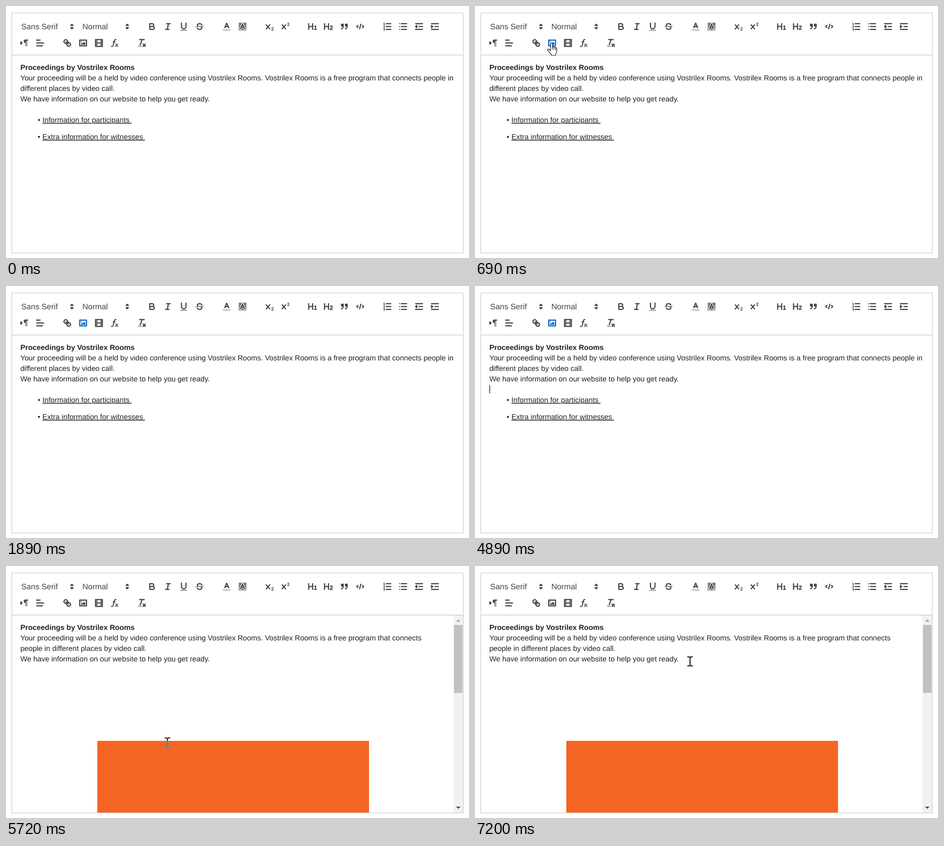
Recreate the animation shown at these times as an HTML page. Size 1014 px wide and 552 px high, loop 8 s.

```html
<!DOCTYPE html>
<html lang="en">
<head>
<meta charset="utf-8">
<title>Inserting an image in a rich text editor</title>
<style>
  html, body { margin: 0; width: 100%; height: 100%; overflow: hidden; background: #fff; }
  svg { display: block; width: 100%; height: 100%; isolation: isolate; }
  text { font: 16.12px 'Liberation Sans', Arial, sans-serif; fill: #212121; text-rendering: geometricPrecision; }
  .label { font-size: 17.4px; fill: #444; }
  .bold { font-weight: 700; }
  .link { text-decoration: underline; }
  .icon { color: #444; fill: none; stroke: currentColor; stroke-width: 2; stroke-linecap: round; stroke-linejoin: round; }
  .icon.active { color: #06c; }
  .fill { fill: currentColor; stroke: none; }
  .both { fill: currentColor; }
  .thin { stroke-width: 1; }
  .frame { fill: none; stroke: #ccc; stroke-width: 1.4; }
  .caret { fill: #111; }
  #beam { fill: none; stroke: #fff; stroke-width: 2; mix-blend-mode: difference; }
  #hand { fill: #fff; stroke: #111; stroke-width: 1.2; stroke-linejoin: round; stroke-linecap: round; }
</style>
</head>
<body>
<svg viewBox="0 0 1014 552">
  <rect width="1014" height="552" fill="#fff"/>
  <g id="toolbar">
    <text class="label" x="33.3" y="51">Sans Serif</text>
    <text class="label" x="167.2" y="51">Normal</text>
  </g>

  <text class="bold" x="31.4" y="140">Proceedings by Vostrilex Rooms</text>
  <text x="31.4" y="209">We have information on our website to help you get ready.</text>

  <g id="before">
    <text x="31.4" y="163">Your proceeding will be a held by video conference using Vostrilex Rooms. Vostrilex Rooms is a free program that connects people in</text>
    <text x="31.4" y="186">different places by video call.</text>
    <text x="69.3" y="255">•</text>
    <text class="link" x="79.8" y="255">Information for participants&#160;</text>
    <text x="69.3" y="292">•</text>
    <text class="link" x="79.8" y="292">Extra information for witnesses&#160;</text>
    <rect id="lineCaret" class="caret" x="31.5" y="217" width="1.4" height="18"/>
  </g>

  <g id="after">
    <text x="31.4" y="163">Your proceeding will be a held by video conference using Vostrilex Rooms. Vostrilex Rooms is a free program that connects</text>
    <text x="31.4" y="186">people in different places by video call.</text>
    <svg y="108" width="1001" height="432.5" viewBox="0 108 1001 432.5">
      <rect x="200" y="383" width="595" height="595" fill="#f56523"/>
      <rect id="imageCaret" class="caret" x="960.2" y="215" width="1.4" height="400"/>
    </svg>
    <rect x="980" y="108" width="21" height="432.5" fill="#f1f1f1"/>
    <rect x="981.2" y="129" width="18.6" height="149" fill="#c1c1c1"/>
    <path d="M985.5 122h10l-5-5z" fill="#a3a3a3"/>
    <path d="M985.5 527h10l-5 5z" fill="#505050"/>
  </g>

  <path class="frame" d="M12.6 15.4H1001.5V540.9H12.6zM12.6 107.5H1001.5"/>

  <path id="beam" d="M-6-10H-2L0-8.5 2-10H6M0-8.5V8.5M-6 10H-2L0 8.5 2 10H6"/>
  <g id="hand">
    <path d="M-2 16V2.2a2 2 0 0 1 4 0V9q1.500-1.500 3.500.500 2-1 3.500.800 2.500-.500 2.500 2V18q0 3-2.500 6.500V27H-.500V24.500L-8 16.500q-1.500-2.500.600-3.300Q-5.500 13-2 17z"/>
    <path d="M2 9v5M5.500 9.500v5M9 10.300V15"/>
  </g>
</svg>

<script>
const LOOP = 8000;
const UNIT = 1.24;   // toolbar icons use an 18-unit box
const PITCH = 34.72;
const GAP = 59.4;
const $ = id => document.getElementById(id);

const line = (x1, y1, x2, y2, cls = '') => `<path class="${cls}" d="M${x1} ${y1}L${x2} ${y2}"/>`;
const path = (d, cls = '') => `<path class="${cls}" d="${d}"/>`;
const rect = (x, y, w, h, cls = '', r = 0) =>
  `<rect class="${cls}" x="${x}" y="${y}" width="${w}" height="${h}" rx="${r}"/>`;
const rows = (starts, ends) => [4, 9, 14].map((y, i) => line(starts[i], y, ends[i], y)).join('');

const cross = line(3, 6, 9, 13) + line(9, 6, 3, 13);
const smallTwo = y => path(`M12.5 ${y + 1.6}q.4-1.200 1.500-1.200 1.300.100 1.300 1.400c0 2-2.800 2.300-2.800 3.700h3`, 'thin');
const letterH = path('M2 4V14M9 4V14M2 9H9');
const letterA = y => path(`M5.500 ${y + 8}L9 ${y}L12.500 ${y + 8}M6.380 ${y + 6}H11.630`);

function hatch() {
  let out = '';
  for (let s = 6; s <= 30; s += 2) {
    const a = Math.max(2.5, s - 15.5), b = s - a;
    out += line(a, b, b, a, 'thin');
  }
  return out;
}

function film() {
  let out = rect(3, 3, 12, 12) + rect(5, 3, 1, 12, 'fill') + rect(12, 3, 1, 12, 'fill') + rect(5, 8, 8, 2, 'fill');
  for (const y of [5, 7, 10, 12]) out += rect(3, y, 3, 1, 'fill') + rect(12, y, 3, 1, 'fill');
  return out;
}

const strike = path('M9.007 8C6.542 7.791 6 7.519 6 6.500 6 5.792 7.283 5 9 5c1.571 0 2.765.679 2.969 1.309a1 1 0 0 0 1.900-.617C13.356 4.106 11.354 3 9 3 6.200 3 4 4.538 4 6.500a3.200 3.200 0 0 0 .500 1.843z', 'fill');
const chain = path('M8.900 4.577a3.476 3.476 0 0 1 .360 4.679A3.476 3.476 0 0 1 4.577 8.900C3.185 7.500 2.035 6.400 4.217 4.217S7.500 3.185 8.900 4.577z');
const halfTurn = shape => `<g transform="rotate(180 9 9)">${shape}</g>`;
const quote = x => rect(x, 5, 3, 3, 'both') + path(`M${x + 3} 8c0 4.031-3 5-3 5`);

const icons = {
  picker: path('M7 11L9 13 11 11zM7 7L9 5 11 7z'),
  bold: path('M5 4H9.500a2.500 2.500 0 0 1 0 5H5zM5 9H10.500a2.500 2.500 0 0 1 0 5H5z'),
  italic: path('M7 4H13M5 14H11M8 14L10 4'),
  underline: path('M5 3V9a4 4 0 0 0 8 0V3') + rect(3, 15, 12, 1, 'fill', .5),
  strike: line(15.5, 8.5, 2.5, 9.5, 'thin') + strike + halfTurn(strike),
  color: `<g opacity=".4">${line(3, 15, 15, 15)}</g>` + letterA(3),
  background: hatch() + `<g stroke="#fff" stroke-width="4">${letterA(5)}</g>` + letterA(5),
  sub: cross + smallTwo(10),
  sup: cross + smallTwo(2),
  h1: letterH + path('M12.300 9L14.200 7.700V14M12.200 14H15.900" stroke-width="1.700'),
  h2: letterH + path('M12.200 8.700Q13 7.800 14 7.800 15.600 7.900 15.600 9.400C15.600 11.500 12.200 12 12 14H16" stroke-width="1.700'),
  quote: quote(4) + quote(11),
  code: path('M5 7L3 9 5 11M13 7L15 9 13 11M10 5L8 13'),
  ordered: rows([7, 7, 7], [15, 15, 15]) +
    path('M2.500 5.500h2M2.500 3L3.500 2.500v3M4.500 10.500h-2c0-.234 1.850-1.076 1.850-2.234A.959.959 0 0 0 2.500 8.156M2.500 14.846a.959.959 0 0 0 1.850-.109A.700.700 0 0 0 3.750 14a.688.688 0 0 0 .600-.736.959.959 0 0 0-1.850-.109', 'thin'),
  bullets: rows([6, 6, 6], [15, 15, 15]) + rows([3, 3, 3], [3, 3, 3]),
  outdent: rows([3, 9, 3], [15, 15, 15]) + path('M5 7V11L3 9z'),
  indent: rows([3, 9, 3], [15, 15, 15]) + path('M3 7V11L5 9z', 'both'),
  direction: path('M3 11L5 9 3 7z', 'both') + line(15, 4, 11, 4) +
    path('M11 3a3 3 0 0 0 0 6h1V3z', 'fill') + rect(11, 4, 1, 11, 'fill') + rect(13, 4, 1, 11, 'fill'),
  align: rows([3, 3, 3], [9, 15, 13]),
  link: line(7, 7, 11, 11) + chain + halfTurn(chain),
  image: rect(3, 4, 12, 10) + '<circle class="fill" cx="6" cy="7" r="1"/>' +
    path('M5 12V11L7 9 8 10 11 7 13 9V12z', 'fill'),
  video: film(),
  formula: path('M11.759 2.482a2.561 2.561 0 0 0-3.530.607A7.656 7.656 0 0 0 6.800 6.200C6.109 9.188 5.275 14.677 4.150 14.927a1.545 1.545 0 0 0-1.300-.933A.922.922 0 0 0 2 15.036S1.954 16 4.119 16s3.091-2.691 3.700-5.553L8.775 6.200c.381-1.421.807-2.521 1.306-2.676a1.014 1.014 0 0 0 1.020.560A.966.966 0 0 0 11.759 2.482z', 'fill') +
    rect(5.15, 6.2, 5, 1.6, 'fill', .8) +
    path('M9.700 15.200Q10.500 15.200 11.800 13.200T15 11.200M10.300 11Q11.800 10.500 12.200 12.200C12.700 14.500 13 15.700 14.700 15.100" stroke-width="1.300'),
  clean: path('M5 3H13M6 12L9.350 3M11 11L15 15M15 11L11 15') + rect(2, 14, 7, 1, 'fill', .5),
};

function addIcon(name, x, y) {
  $('toolbar').insertAdjacentHTML('beforeend',
    `<g class="icon" id="icon-${name}" transform="translate(${x - 9 * UNIT} ${y - 9 * UNIT}) scale(${UNIT})">${icons[name]}</g>`);
}

function addGroups(x, y, groups) {
  for (const group of groups) {
    for (const name of group.split(' ')) {
      addIcon(name, x, y);
      x += PITCH;
    }
    x += GAP - PITCH;
  }
}

addIcon('picker', 144.3, 45);
addIcon('picker', 265.5, 45);
addGroups(319.8, 45, ['bold italic underline strike', 'color background', 'sub sup',
  'h1 h2 quote code', 'ordered bullets outdent indent']);
addGroups(40, 81, ['direction align', 'link image video formula', 'clean']);

// Pointer trips: [ms, x, y]; the pointer is hidden between trips.
const trips = [
  [[140, 352.5, 372], [340, 256, 222], [520, 186, 118], [620, 170, 88], [690, 167.500, 81],
   [890, 167.5, 81], [960, 181, 67], [1090, 181, 72], [1230, 181, 72], [1290, 171, 78],
   [1830, 171, 78], [1840, 160, 62], [1890, 160, 62]],
  [[5160, 262, 54], [5300, 288, 150], [5500, 328, 300], [5640, 348, 370], [5720, 353.5, 386.5],
   [5770, 353.5, 386.5], [5830, 364, 410], [6030, 364, 410], [6150, 376, 440], [6350, 412, 340],
   [6560, 458, 230], [6700, 470, 205], [6790, 471, 209], [LOOP, 471, 209]],
];

function pointerAt(t) {
  const trip = trips.find(k => t >= k[0][0] && t < k[k.length - 1][0]);
  if (!trip) return null;
  const i = trip.findIndex(k => k[0] > t);
  const [t0, x0, y0] = trip[i - 1], [t1, x1, y1] = trip[i];
  const p = (t - t0) / (t1 - t0);
  return [x0 + (x1 - x0) * p, y0 + (y1 - y0) * p];
}

const show = (id, on) => { $(id).style.display = on ? '' : 'none'; };
const within = (t, from, to) => t >= from && t < to;

function draw(t) {
  const inserted = t >= 5000;
  show('before', !inserted);
  show('after', inserted);
  show('lineCaret', within(t, 1000, 1260) || t >= 4890);
  show('imageCaret', t < 5500 || within(t, 6030, 6530));
  $('icon-image').classList.toggle('active', within(t, 600, 5160));

  const pointer = pointerAt(t);
  const overToolbar = pointer && pointer[1] < 107;
  show('hand', overToolbar);
  show('beam', pointer && !overToolbar);
  if (pointer) $(overToolbar ? 'hand' : 'beam').setAttribute('transform', `translate(${pointer})`);
}

const start = performance.now();
function tick() {
  draw((performance.now() - start) % LOOP);
  requestAnimationFrame(tick);
}
tick();
</script>
</body>
</html>
```
